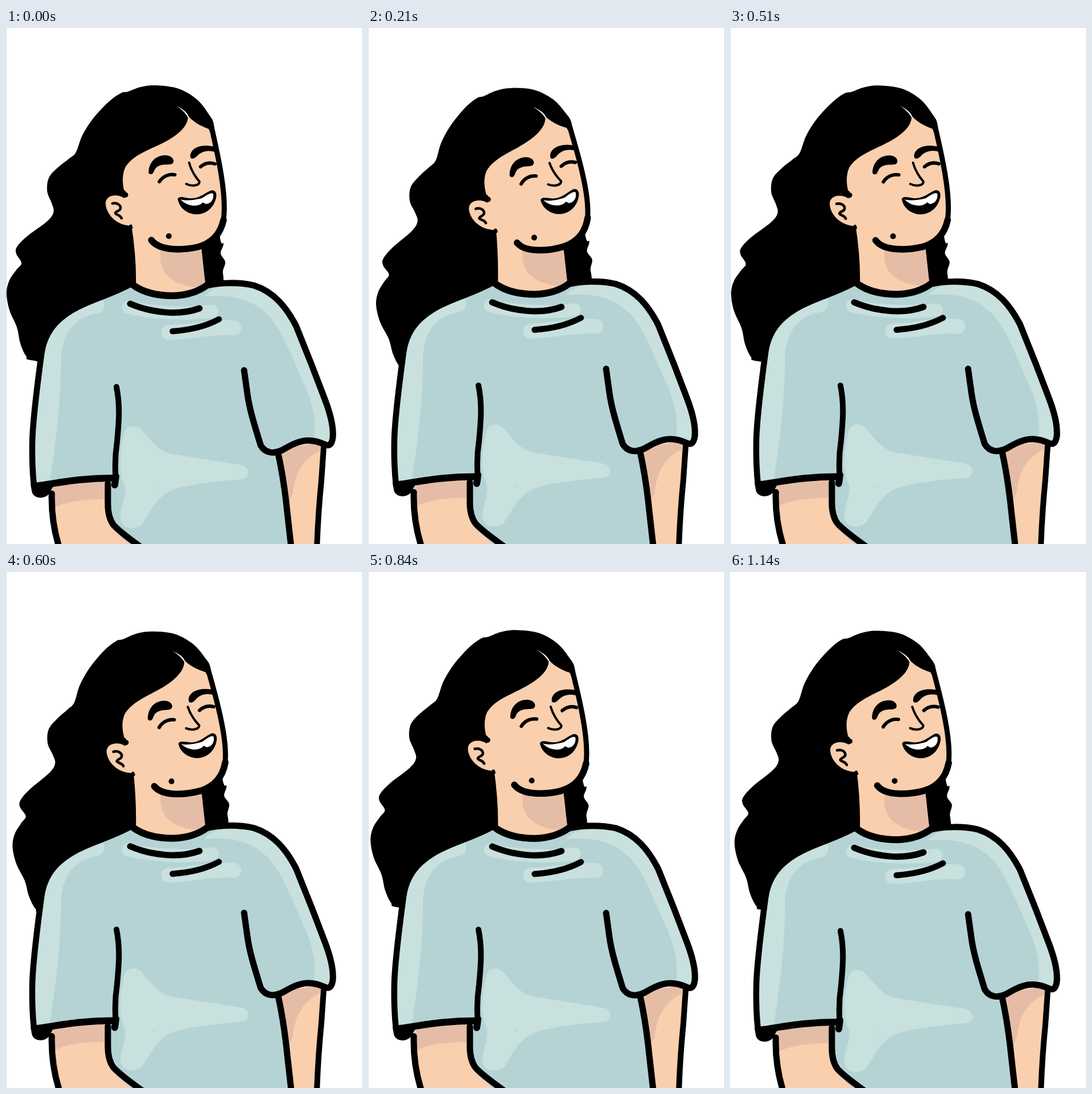
An HTML page that plays this animation: 622 by 900 pixels, repeating every 1.17 s.

```html
<!DOCTYPE html>
<html lang="en">
<head>
<meta charset="utf-8">
<title>Laughing woman</title>
<style>
html, body { margin: 0; width: 100%; height: 100%; overflow: hidden; background: #fff; }
svg { display: block; width: 100vw; height: 100vh; }
.line { fill: none; stroke: #000; stroke-width: 11; stroke-linecap: round; stroke-linejoin: round; }
.skin { fill: #facfad; }
.shade { fill: #e5bda7; }
.shirt { fill: #b5d3d4; }
.light { fill: #c8e0de; }
.glow { fill: none; stroke: #c8e0de; stroke-linecap: round; }
</style>
</head>
<body>
<svg viewBox="0 0 622 900" preserveAspectRatio="none">
  <rect width="622" height="900" fill="#fff"/>
  <path id="hair"/>
  <path id="neck" class="skin"/>
  <path id="neckShade" class="shade" d="M270 384C268 408 272 424 285 435C300 448 325 454 349 453L341 380Z"/>

  <g id="head">
    <path class="skin" d="M318 153C326 163 340 171 354 176C364 195 370 220 375 250C381 285 384 315 379 340C373 362 358 376 335 382C308 388 268 389 254 370L226 362L219 345C190 344 174 322 174 305C175 291 194 288 207 297L206 282C203 268 203 254 209 242C220 224 245 214 267 204C290 193 319 176 318 153Z"/>
    <path d="M297 135C312 143 320 150 319 158C314 148 306 141 297 135Z" fill="#fff"/>
    <path class="line" d="M359 172C364 195 370 220 375 250C381 285 384 315 379 340" stroke-width="9" style="stroke-width:9"/>
    <path class="line" d="M380 335C374 362 358 376 335 382C308 388 268 389 254 370" style="stroke-width:11.5"/>
    <path class="line" d="M205 287C206 291 208 292 209 291" style="stroke-width:9"/>
    <path class="line" d="M218 345L219 348" style="stroke-width:5"/>
    <path class="line" d="M186 306C194 304 201 309 200 315C198 320 192 319 191 323C193 327 199 325 202 332" style="stroke-width:4.5"/>
    <path d="M249 251C250 234 262 221 280 222C292 223 296 233 290 237C283 240 272 235 262 244C258 249 258 255 253 255Q249 255 249 251Z"/>
    <path d="M322 222C324 208 342 202 364 207L365 216C350 212 341 216 334 223C329 229 321 230 322 222Z"/>
    <path class="line" d="M268 268C274 259 284 254 295 256" style="stroke-width:6"/>
    <path class="line" d="M340 242C347 236 356 234 365 237" style="stroke-width:6"/>
    <path class="line" d="M320 235C324 250 332 261 338 268C338 275 325 277 315 272" style="stroke-width:4"/>
    <path d="M300 298C303 292 312 296 321 297C340 298 350 285 360 283C368 283 369 292 366 300C360 318 345 326 330 325C314 323 302 312 300 298Z"/>
    <path d="M305 299C315 302 330 300 342 297C350 292 358 286 362 289C364 298 358 307 349 307L344 304C338 312 318 313 305 299Z" fill="#fff"/>
    <circle cx="284.5" cy="363" r="5"/>
  </g>

  <g id="body">
    <!-- arms -->
    <path class="skin" d="M80 790L179 785L179 850Q190 882 235 910L96 912Q80 865 80 790Z"/>
    <path class="shade" d="M82 790L178 785L176 822C140 823 112 823 84 837Z"/>
    <path class="skin" d="M474 735L556 722Q546 820 543 912L500 912Z"/>
    <path class="shade" d="M474 735L552 722L551 736C520 750 506 775 502 805Q501 818 494 824Z"/>
    <!-- shirt -->
    <path class="shirt" d="M219 446Q245 467 292 467Q328 466 352 448C395 440 440 446 470 468Q497 495 507 520L558 650Q573 690 573 710Q572 732 560 729C530 710 510 720 478 738L492 850L499 912L232 912Q180 878 179 850L178 786L49 798L46 720Q48 650 58 590C64 525 92 498 145 478Q190 462 219 446Z"/>
    <path class="light" d="M170 474C175 490 168 497 154 499C122 505 99 530 96 575C97 640 88 720 76 793L50 797L48 700L60 585C68 520 110 490 170 474Z"/>
    <path class="light" d="M346 468C400 464 432 474 460 503C484 530 500 575 518 615Q546 672 538 719L560 728L571 705L506 520C480 470 450 446 400 447Q365 448 346 468Z"/>
    <path class="glow" d="M214 487C250 497 320 500 360 494" stroke-width="23"/>
    <path class="glow" d="M284 531C320 531 360 520 398 523" stroke-width="26"/>
    <path class="light" d="M206 708C211 690 230 691 238 702C255 722 268 739 290 743L410 762C428 765 428 785 412 787C370 791 320 795 290 806C262 818 252 845 240 862C230 877 202 876 200 855C200 835 211 815 208 800C196 775 198 745 206 708Z"/>
    <path d="M255 804L262 799L259 803Z" fill="#b5cfce"/>
    <!-- outlines -->
    <path class="line" d="M80 812C79 850 84 880 95 912"/>
    <path class="line" d="M178 795L178 830Q178 854 188 867Q200 880 238 907"/>
    <path class="line" d="M475 740C483 775 489 820 492 850L499 912"/>
    <path class="line" d="M555 732L551 790Q545 850 543 912" style="stroke-width:10"/>
    <path class="line" d="M219 446C190 462 165 469 140 480C95 499 68 525 62 568C55 620 47 680 46 720Q45 765 49 800" style="stroke-width:10.5"/>
    <path class="line" d="M52 799C95 793 130 785 188 785" style="stroke-width:12"/>
    <path d="M43 795L45 808C48 823 70 822 76 811L84 797Z"/>
    <path class="line" d="M192 782L190 797" style="stroke-width:12"/>
    <path class="line" d="M193 626C200 660 197 690 194 722Q189 755 192 790" style="stroke-width:10"/>
    <path class="line" d="M219 446Q245 467 292 467Q328 466 352 448" style="stroke-width:12"/>
    <path class="line" d="M352 449C375 444 407 443 433 449C468 460 490 487 507 520L535 590L558 650Q573 690 571 714C569 730 562 729 556 726C530 714 511 720 490 732C468 746 453 741 445 728C435 695 426 668 422 640L416 597"/>
    <path class="line" d="M217 481C255 497 302 502 338 489"/>
    <path class="line" d="M291 529C320 527 348 521 372 508" style="stroke-width:10.5"/>
  </g>
  <rect id="edge" width="1" height="900" fill="#dcdcdc"/>
</svg>
<script>
const $ = id => document.getElementById(id);
const LOOP = 1170, SLOT = 30;
const PIVOT = [326, 277], SWING = 0.072;

// closed smooth curve through points
function smooth(pts) {
  const at = i => pts[(i + pts.length) % pts.length];
  let d = `M${pts[0]}`;
  pts.forEach((p, i) => {
    const q = at(i + 1), a = at(i - 1), b = at(i + 2);
    const c1 = p.map((v, j) => v + (q[j] - a[j]) / 6);
    const c2 = q.map((v, j) => v - (b[j] - p[j]) / 6);
    d += `C${c1} ${c2} ${q}`;
  });
  return d + 'Z';
}

$('hair').setAttribute('d', smooth([
  [262, 100], [235, 103], [213, 111], [202, 113], [185, 124], [167, 141], [149, 162],
  [133, 188], [122, 217], [110, 228], [91, 243], [75, 261], [72, 285], [80, 306],
  [83, 321], [72, 337], [36, 364], [19, 382], [18, 394], [27, 410], [18, 422],
  [6, 440], [1, 462], [6, 492], [19, 522], [25, 550], [35, 572], [48, 580],
  [150, 590], [378, 480], [380, 440], [379, 424], [383, 408], [375, 393],
  [380, 376], [373, 358], [362, 200], [363, 168], [354, 150], [334, 125], [302, 106]
]));

function turn([x, y], a) {
  const dx = x - PIVOT[0], dy = y - PIVOT[1], c = Math.cos(a), s = Math.sin(a);
  return [PIVOT[0] + dx * c + dy * s, PIVOT[1] - dx * s + dy * c];
}

const ease = (n, a, b) => {
  const u = Math.min(1, Math.max(0, (n - a) / (b - a)));
  return u * u * (3 - 2 * u);
};

function draw(t) {
  // four poses per five slots, the first one held twice
  const slot = Math.floor((t % LOOP) / SLOT);
  const n = 4 * Math.floor(slot / 5) + Math.max(0, slot % 5 - 1);
  const angle = SWING * (1 - Math.cos(Math.PI * Math.min(n, 27) / 6)) / 2;
  const lift = 2.5 * (ease(n, 0, 5) - ease(n, 21, 26));

  const spin = `rotate(${-angle * 180 / Math.PI} ${PIVOT})`;
  $('hair').setAttribute('transform', spin);
  $('head').setAttribute('transform', spin);
  $('body').setAttribute('transform', `translate(0 ${-lift})`);
  $('neckShade').setAttribute('transform', `translate(0 ${-lift})`);

  const top = turn([219, 343], angle), y = 446 - lift;
  $('neck').setAttribute('d',
    `M${top}Q228 400 227 ${y}Q290 ${y + 40} 349 ${y + 4}Q343 415 341 380L300 340Z`);
  $('edge').setAttribute('visibility', n < 30 ? 'visible' : 'hidden');
}

const start = performance.now();
function tick() {
  draw(performance.now() - start);
  requestAnimationFrame(tick);
}
draw(0);
requestAnimationFrame(tick);
</script>
</body>
</html>
```
